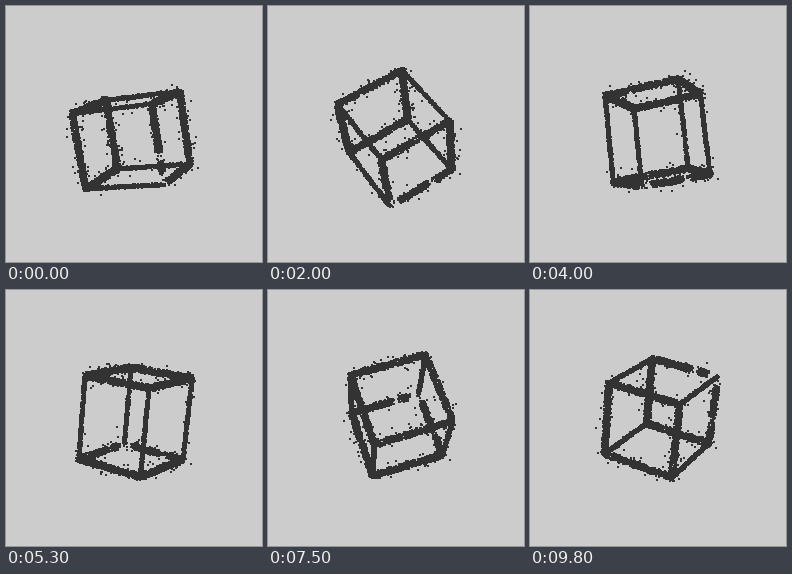
Write an HTML page with a canvas that moves like this. It is 256 by 256 pixels and loops after 10000 ms.

```html
<!DOCTYPE html>
<html lang="en">
<head>
<meta charset="utf-8">
<title>Tumbling dotted box</title>
<style>
html, body { margin: 0; width: 100%; height: 100%; overflow: hidden; background: #ccc; }
canvas { display: block; }
</style>
</head>
<body>
<canvas id="stage" width="256" height="256"></canvas>
<script>
const ctx = document.getElementById('stage').getContext('2d');
const LOOP = 10000, DEPTH = 650;
const HALF = [38, 38, 42.5];
const SPIN_AXIS = [-0.787, -0.497, 0.366];
const BASIS = [[0.583, -0.165, -0.797], [0.806, 0.185, 0.549], [-0.09, 0.968, -0.241]];
const DOTS_PER_EDGE = 700;

let seed = 7;
function rand() {
  seed = (seed * 1664525 + 1013904223) % 4294967296;
  return seed / 4294967296;
}

// Two of the edges that meet at one corner are worn away in places.
function isWorn(axis, p) {
  if (axis === 0 && p[1] < 0 && p[2] > 0) {
    const t = (1 - p[0]) / 2;
    return t < 0.16 || (t > 0.28 && t < 0.4);
  }
  if (axis === 1 && p[0] > 0 && p[2] > 0) {
    const t = (1 + p[1]) / 2;
    return t < 0.15 || (t > 0.6 && t < 0.71);
  }
  return false;
}

function makeDots() {
  const dots = [];
  for (let axis = 0; axis < 3; axis++) {
    const thin = axis === 2;
    const radius = thin ? 2 : 3.6;
    for (const a of [-1, 1]) for (const b of [-1, 1]) {
      for (let i = 0; i < DOTS_PER_EDGE; i++) {
        const p = [0, 0, 0];
        p[axis] = rand() * 2 - 1;
        p[(axis + 1) % 3] = a;
        p[(axis + 2) % 3] = b;
        const angle = rand() * Math.PI * 2;
        const stray = rand() < (thin ? 0.01 : 0.06);
        const r = radius * Math.sqrt(rand()) + (stray ? 9 * rand() ** 2 : 0);
        if (isWorn(axis, p) && rand() > 0.03) continue;
        dots.push({ p, dx: r * Math.cos(angle), dy: r * Math.sin(angle) });
      }
    }
  }
  return dots;
}

function rotate(v, angle) {
  const [x, y, z] = SPIN_AXIS;
  const c = Math.cos(angle), s = Math.sin(angle);
  const dot = (x * v[0] + y * v[1] + z * v[2]) * (1 - c);
  const cross = [y * v[2] - z * v[1], z * v[0] - x * v[2], x * v[1] - y * v[0]];
  return v.map((n, i) => n * c + cross[i] * s + SPIN_AXIS[i] * dot);
}

function draw(step) {
  const angle = 0.0496 * (step - 47.6) + 0.07 * Math.cos((step - 12) * 0.0785);
  const sides = BASIS.map((e, i) => rotate(e, angle).map(n => n * HALF[i]));
  const centerX = 126.5 + 0.05 * step, centerY = 133 - 0.095 * step;
  ctx.fillStyle = '#ccc';
  ctx.fillRect(0, 0, 256, 256);
  ctx.fillStyle = '#333';
  for (const { p, dx, dy } of dots) {
    const [x, y, z] = [0, 1, 2].map(i => sides[0][i] * p[0] + sides[1][i] * p[1] + sides[2][i] * p[2]);
    const scale = 1 / (1 - z / DEPTH);
    ctx.fillRect(Math.round(centerX + x * scale + dx - 0.5), Math.round(centerY + y * scale + dy - 0.5), 2, 2);
  }
}

const dots = makeDots();
const start = performance.now();
let shown = -1;

function tick() {
  const t = (performance.now() - start) % LOOP;
  // Ten steps of 100 ms, then one beat of rest.
  const step = 10 * Math.floor(t / 1100) + Math.floor(t % 1100 / 100);
  const pose = Math.min(step, 90);
  if (pose !== shown) draw(shown = pose);
  requestAnimationFrame(tick);
}
tick();
</script>
</body>
</html>
```
